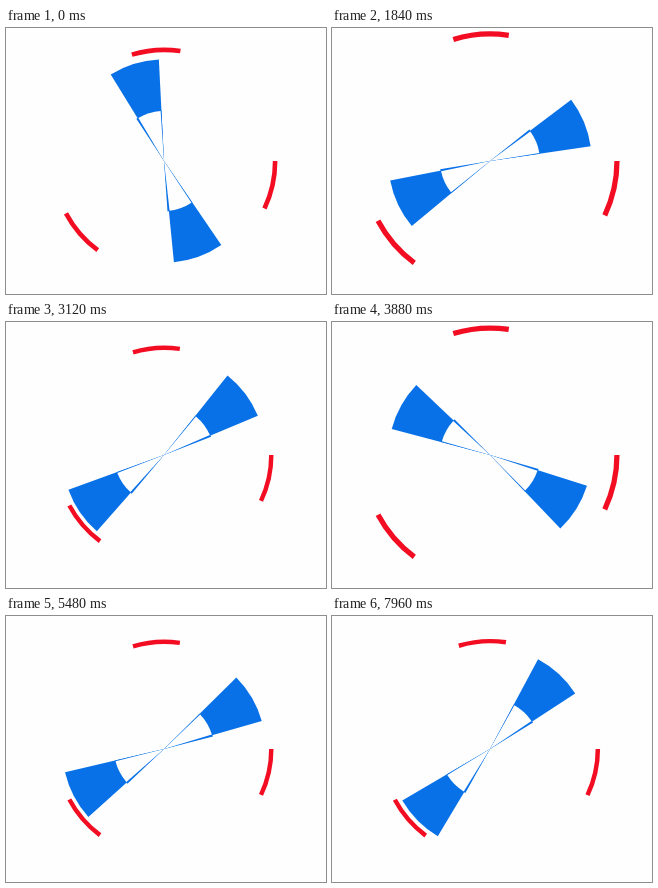
Animation, 320 px wide and 266 px high, one loop 8 s. Source, as an HTML page:

```html
<!DOCTYPE html>
<html lang="en">
<head>
<meta charset="utf-8">
<title>Spinner</title>
<style>
  html, body { margin: 0; width: 100%; height: 100%; overflow: hidden; background: #fefefe; }
  svg { display: block; width: 100%; height: 100%; }
</style>
</head>
<body>
<svg viewBox="0 0 320 266">
  <g transform="translate(158 133)">
    <g id="arcs" fill="none" stroke="#f20d22" stroke-width="4.6"></g>
    <g id="blades"></g>
  </g>
</svg>
<script>
const LOOP = 8000, STEP = 40;
const RESTART = 7160, RESTART_PHASE = 7175;
const SPIN = -0.1497, START_ANGLE = 238.4;
const PULSE = 2530, NEAR = 107.3, FAR = 127;
const BLUE = '#0871e7', WHITE = '#fefefe';
const arcs = document.getElementById('arcs');
const blades = document.getElementById('blades');

const polar = (r, deg) => {
  const a = deg * Math.PI / 180;
  return `${(r * Math.cos(a)).toFixed(3)} ${(r * Math.sin(a)).toFixed(3)}`;
};
const arc = (r, from, to) => `M${polar(r, from)}A${r} ${r} 0 0 1 ${polar(r, to)}`;
const wedge = (r, from, to) => `${arc(r, from, to)}L0 0Z`;

function addPath(parent, d, fill) {
  const path = document.createElementNS('http://www.w3.org/2000/svg', 'path');
  path.setAttribute('d', d);
  if (fill) path.setAttribute('fill', fill);
  parent.append(path);
}

for (let i = 0; i < 3; i++) addPath(arcs, arc(111, i * 126.6, i * 126.6 + 25.3));

// Outer blade, then the slightly turned inner wedge with its white cutout.
function addBlade(start, lead, trail) {
  const end = start + 28.7;
  addPath(blades, wedge(101.7, start, end), BLUE);
  addPath(blades, wedge(50.5, start - lead, end + trail), BLUE);
  addPath(blades, wedge(50, start + (lead ? 0.8 : 1), end - (trail ? 0.8 : 1)), WHITE);
}
addBlade(0, 1.6, 0);
addBlade(177.3, 0, 1.6);

const smooth = (from, to, t) => {
  const x = Math.min(1, Math.max(0, (t - from) / (to - from)));
  return x * x * (3 - 2 * x);
};

function radiusAt(time) {
  const t = (time + PULSE - 300) % PULSE + 300;
  return NEAR + (FAR - NEAR) * (smooth(720, 1370, t) - smooth(1820, 2810, t));
}

function draw(now) {
  const t = Math.floor((now % LOOP) / STEP) * STEP;
  const phase = t < RESTART ? t : Math.max(0, t - RESTART_PHASE);
  blades.setAttribute('transform', `rotate(${START_ANGLE + SPIN * phase})`);
  arcs.setAttribute('transform', `scale(${radiusAt(phase) / 111})`);
}

const began = performance.now();
function tick() {
  draw(performance.now() - began);
  requestAnimationFrame(tick);
}
tick();
</script>
</body>
</html>
```
